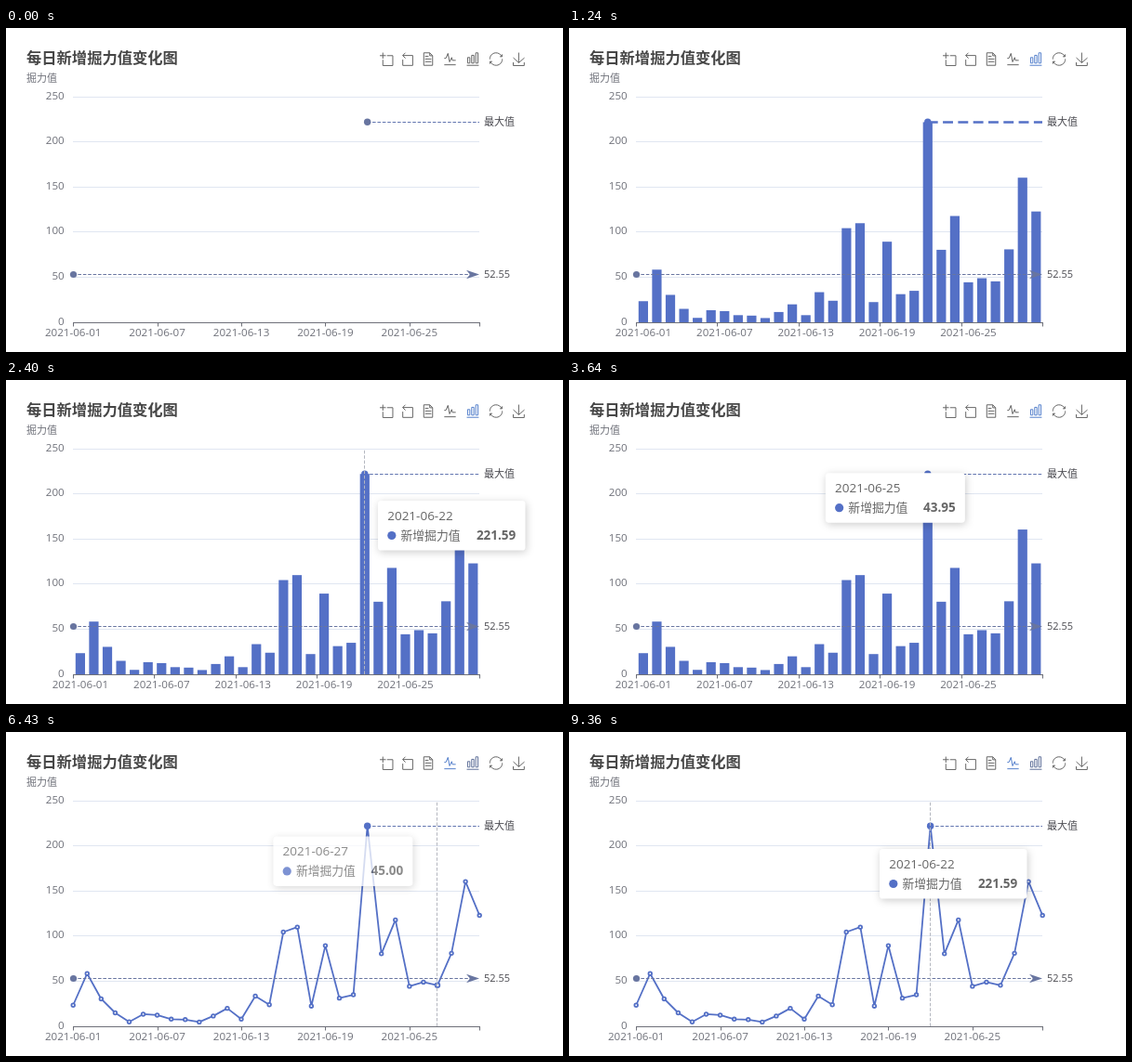
An HTML page for the animation above (9440 ms loop, 599 px wide and 349 px high).

```html
<!DOCTYPE html>
<html lang="zh">
<head>
<meta charset="utf-8">
<title>每日新增掘力值变化图</title>
<style>
html, body { margin: 0; width: 100%; height: 100%; overflow: hidden; background: #fff; }
svg { display: block; width: 599px; height: 349px; }
text { font-family: "Open Sans", "Noto Sans CJK SC", "Noto Sans CJK JP", "Noto Sans CJK", sans-serif; }
.axis { fill: #6e7079; font-size: 11.6px; }
.unit { fill: #6e7079; font-size: 11px; }
.mark { fill: #4a4a50; font-size: 11px; }
.icon { fill: none; stroke: #666; }
.icon.on { stroke: #5580cc; }
.icon.dim { stroke: #5f7099; }
.icon path { vector-effect: non-scaling-stroke; }
.tip rect { fill: #fff; filter: drop-shadow(1px 2px 4px rgba(0, 0, 0, .2)); }
.tip text { fill: #666; font-size: 13.5px; }
</style>
</head>
<body>
<script>
const LOOP = 9440, LEFT = 72, RIGHT = 509, BASE = 317, UNIT = 0.972;
const BLUE = '#5470c6', DULL = '#6875a0';
const BAR_AT = 340, LINE_AT = 4320, PEAK = 21;
const data = [23, 58, 30, 14.5, 4.5, 13, 12, 7.5, 7, 4.3, 11, 19.5, 7.5, 33, 23.5,
  104, 109.5, 22, 89, 30.8, 34.5, 221.59, 80, 117.5, 43.95, 48.5, 45, 80.5, 160, 122.5];
const band = (RIGHT - LEFT) / data.length, step = (RIGHT - LEFT) / (data.length - 1);
const lineX = i => LEFT + 0.2 + i * step;
const barX = i => LEFT + 0.6 + (i + 0.5) * band;
const toY = v => BASE - 0.4 - v * UNIT;
const clamp = v => Math.max(0, Math.min(1, v));
const easeOut = (p, n) => 1 - Math.pow(1 - clamp(p), n);

function set(el, attrs) {
  for (const k in attrs) el.setAttribute(k, attrs[k]);
  return el;
}
function add(parent, tag, attrs, text) {
  const el = set(document.createElementNS('http://www.w3.org/2000/svg', tag), attrs || {});
  if (text !== undefined) el.textContent = text;
  parent.appendChild(el);
  return el;
}
const show = (el, on) => { el.style.display = on ? '' : 'none'; };

const svg = add(document.body, 'svg', { viewBox: '0 0 599 349' });

// titles and axes
add(svg, 'text', { x: 22, y: 37.5, fill: '#464646', 'font-size': 16.3, 'font-weight': 700 }, '每日新增掘力值变化图');
add(svg, 'text', { x: 22, y: 58, class: 'unit' }, '掘力值');
for (let v = 0; v <= 250; v += 50) {
  const y = Math.floor(BASE - v * UNIT) + 0.5;
  if (v) add(svg, 'path', { d: `M${LEFT} ${y}H${RIGHT}`, stroke: '#e0e6f1' });
  add(svg, 'text', { x: 62.7, y: y + 2.5, class: 'axis', 'text-anchor': 'end' }, v);
}
const ticks = add(svg, 'path', { fill: 'none', stroke: '#6e7079' });
const days = [0, 6, 12, 18, 24];
const dateOf = i => '2021-06-' + String(i + 1).padStart(2, '0');
const dayLabels = days.map(i =>
  add(svg, 'text', { y: 332, class: 'axis', 'text-anchor': 'middle' }, dateOf(i)));

// toolbar: path, its centre, place on stage
const icons = [
  ['M0,13.5h26.9M13.5,26.9V0M32.1,13.5H58V58H13.5V32.1', 29, 29, 409],
  ['M22,1.4L9.9,13.5l12.3,12.3M10.3,13.5H54.9v44.6H10.3v-26', 32.4, 29.7, 432],
  ['M17.5,17.3H33M45.4,29.5h-28M11.5,2v56H51V14.8L38.4,2H11.5zM38.4,2.2v12.7H51M45.4,41.7h-28', 31.2, 30, 454],
  ['M4.1,28.9h7.1l9.3-22l7.4,38l9.7-19.7l3,12.8h14.9M4.1,58h51.4', 29.8, 32.4, 477.5],
  ['M6.7,22.9h10V48h-10zM24.9,13h10v35h-10zM43.2,2h10v46h-10zM3.1,58h53.7', 30, 30, 502],
  ['M47,18.9h9.8V8.7M56.3,20.1C52.1,9,40.5,.6,26.8,2.1C12.6,3.7,1.6,16.2,2.1,30.6M13,41.1H3.1v10.2M3.7,39.9c4.2,11.1,15.8,19.5,29.5,18c14.2-1.6,25.2-14.1,24.7-28.5', 30, 30, 527],
  ['M4.7,22.9L29.3,45.5L54.7,23.4M4.6,43.6V58H53.8V43.6M29.2,45.1V0', 29.6, 29, 551.5]
].map(([d, cx, cy, x]) => {
  const g = add(svg, 'g', { class: 'icon' });
  add(g, 'path', { d, transform: `translate(${x} 33.5) scale(.24) translate(${-cx} ${-cy})` });
  return g;
});

// series
const bars = add(svg, 'g', { fill: BLUE });
const barRects = data.map((v, i) => add(bars, 'rect', { x: barX(i) - 5.1, width: 10.2 }));
const clip = add(add(add(svg, 'defs'), 'clipPath', { id: 'grow' }), 'rect', { x: LEFT - 2, y: 60, height: 270 });
const line = add(svg, 'g');
add(line, 'path', {
  d: 'M' + data.map((v, i) => `${lineX(i)} ${toY(v)}`).join('L'),
  fill: 'none', stroke: BLUE, 'stroke-width': 1.8, 'stroke-linejoin': 'bevel', 'clip-path': 'url(#grow)'
});
const dots = data.map((v, i) =>
  add(line, 'circle', { cx: lineX(i), cy: toY(v), r: 1.8, fill: '#fff', stroke: BLUE, 'stroke-width': 1.8 }));

// mark lines
const avgY = 265.5;
add(svg, 'path', { d: `M${LEFT} ${avgY}H500`, stroke: DULL, 'stroke-dasharray': '3.6 1.8' });
add(svg, 'circle', { cx: LEFT + 0.5, cy: avgY, r: 3.6, fill: DULL });
add(svg, 'path', { d: `M509 ${avgY}L495 ${avgY - 4.7}L499 ${avgY}L495 ${avgY + 4.7}Z`, fill: DULL });
add(svg, 'text', { x: 514, y: 268.5, class: 'mark' }, '52.55');
const maxLine = add(svg, 'path');
const maxDot = add(svg, 'circle', { cy: 101.3, r: 3.7 });
add(svg, 'text', { x: 514, y: 105, class: 'mark' }, '最大值');

const pointer = add(svg, 'path', { stroke: '#b4b7c0', 'stroke-dasharray': '3.6 1.8' });

// tooltip
const tip = add(svg, 'g', { class: 'tip' });
const tipBox = add(tip, 'rect', { height: 53.5, rx: 3.6 });
const tipDate = add(tip, 'text', { x: 10.2, y: 21 });
add(tip, 'circle', { cx: 14.8, cy: 37.5, r: 4.6, fill: BLUE });
add(tip, 'text', { x: 24.5, y: 42, style: 'font-size:12.8px' }, '新增掘力值');
const tipValue = add(tip, 'text', { y: 42, 'text-anchor': 'end', 'font-weight': 700 });

// each visit: when it shows, pointer and fade-out times, moves as [time, x, y, day, duration]
const visits = [
  { from: 1390, leave: 3600, fade: 3750, moves: [
    [1390, 262, 108, 25, 0], [1460, 250, 110, 24, 400], [1540, 240, 113, 23, 400], [1600, 231.5, 115, 22, 400],
    [1930, 231.5, 115, PEAK, 400], [1990, 400, 130, PEAK, 400],
    [3390, 403, 122, 22, 400], [3470, 267.6, 98.6, 24, 400]] },
  { from: 6340, leave: LOOP, fade: LOOP, moves: [
    [6340, 290, 112, 27, 0], [6420, 270, 115, 26, 400], [6500, 255, 118, 25, 400], [6580, 240, 122, 23, 400],
    [6700, 403, 124, PEAK, 400], [9360, 334, 126, PEAK, 0]] }
];

function tipAt(moves, t) {
  let x = 0, y = 0, day = 0;
  moves.forEach(([at, tx, ty, d, dur], n) => {
    if (t < at) return;
    const end = n + 1 < moves.length ? Math.min(t, moves[n + 1][0]) : t;
    const p = dur ? easeOut((end - at) / dur, 5) : 1;
    x += (tx - x) * p;
    y += (ty - y) * p;
    day = d;
  });
  return { x, y, day };
}

function drawTip(t, xOf) {
  const v = visits.find(o => t >= o.from && t < o.fade + 200);
  show(tip, v);
  show(pointer, v && t < v.leave);
  if (!v) return -1;
  const { x, y, day } = tipAt(v.moves, t);
  const width = data[day] >= 100 ? 158.5 : 150;
  set(tip, {
    transform: `translate(${x} ${y})`,
    opacity: Math.min(clamp((t - v.from + 60) / 200), 1 - clamp((t - v.fade) / 200))
  });
  set(tipBox, { width });
  set(tipValue, { x: width - 10.2 });
  tipDate.textContent = dateOf(day);
  tipValue.textContent = data[day].toFixed(2);
  const px = Math.floor(xOf(day)) + 0.5;
  set(pointer, { d: `M${px} ${BASE}V75` });
  return t < v.leave ? day : -1;
}

function draw(t) {
  const bar = t >= BAR_AT && t < LINE_AT;
  const xOf = bar ? barX : lineX;
  icons[3].classList.toggle('on', t >= LINE_AT);
  icons[4].classList.toggle('on', bar);
  icons[4].classList.toggle('dim', t >= LINE_AT);

  days.forEach((d, n) => set(dayLabels[n], { x: xOf(d) }));
  const tickX = days.map(d => bar ? LEFT + d * band : lineX(d)).concat(RIGHT);
  set(ticks, {
    d: `M${LEFT} ${BASE + 0.5}H${RIGHT + 0.5}` +
      tickX.map(x => `M${Math.round(x) + 0.5} ${BASE}v4.5`).join('')
  });

  const hover = drawTip(t, xOf);
  show(bars, bar);
  show(line, !bar);
  if (bar) {
    const p = easeOut((t - BAR_AT) / 1000, 3);
    barRects.forEach((r, i) => {
      const h = (BASE - toY(data[i])) * p;
      set(r, { y: BASE - h, height: h });
    });
  } else {
    const age = t - (t < BAR_AT ? 40 : LINE_AT + 18);
    const p = clamp(age / 1000);
    set(clip, { width: p ? (RIGHT - LEFT) * p + (p < 1 ? 2 : 5) : 0 });
    dots.forEach((c, i) => {
      const s = clamp((age - 1000 * i / (data.length - 1)) / 200);
      set(c, { r: 1.8 * s * (i === hover ? 1.3 : 1), 'stroke-width': 1.8 * s });
    });
  }

  const strong = t >= 1150 && t < 1390;
  set(maxLine, {
    d: `M${xOf(PEAK)} 101.5H${RIGHT}`,
    stroke: strong ? BLUE : '#6275b0',
    'stroke-width': strong ? 2.7 : 1,
    'stroke-dasharray': strong ? '10.9 5.4' : '3.6 1.8'
  });
  set(maxDot, { cx: xOf(PEAK), fill: t < 80 ? DULL : BLUE });
}

const start = performance.now();
function tick() {
  draw((performance.now() - start) % LOOP);
  requestAnimationFrame(tick);
}
tick();
</script>
</body>
</html>
```
